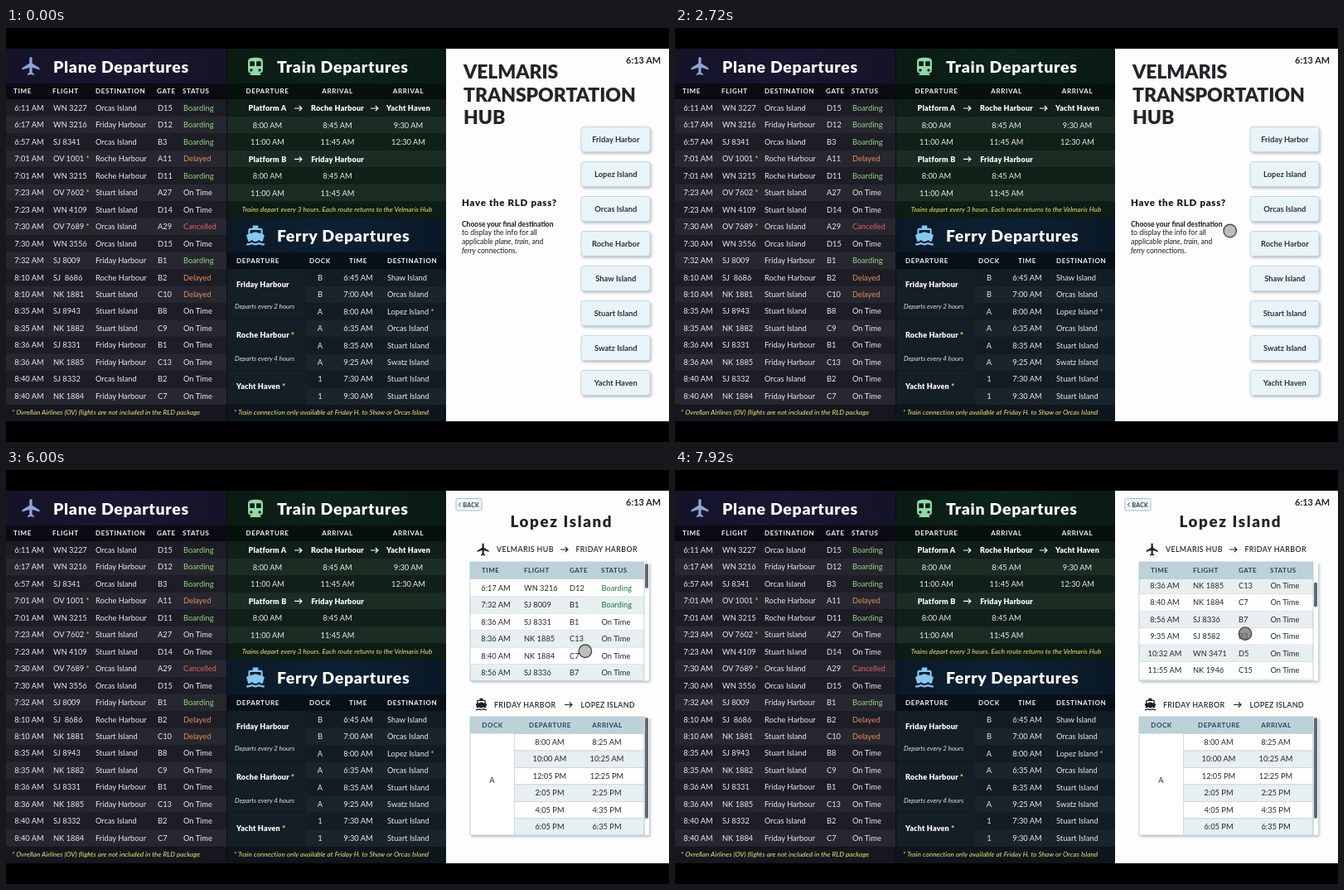
These frames come from a looping animation (800 px wide and 500 px high, 8 s). An HTML page:

```html
<!DOCTYPE html>
<html lang="en">
<head>
<meta charset="utf-8">
<title>Departures board</title>
<style>
html, body { margin: 0; width: 100%; height: 100%; overflow: hidden; background: #000; }
svg { display: block; width: 100vw; height: 100vh; }
text { font: 400 9.3px Lato, "Open Sans", sans-serif; fill: #e9e9ee; white-space: pre; }
.head { font-weight: 700; font-size: 8px; letter-spacing: .65px; fill: #f2f2f5; }
.title { font-weight: 900; font-size: 19.5px; letter-spacing: .7px; fill: #fff; }
.place { font-weight: 900; font-size: 9px; letter-spacing: .2px; fill: #fff; }
.note { font-style: italic; font-size: 8.2px; letter-spacing: .04px; fill: #f0e96a; }
.small { font-style: italic; font-size: 7.9px; fill: #dfe4e8; }
.hub { font-weight: 900; font-size: 23px; letter-spacing: -.1px; fill: #232529; }
.clock { font-weight: 700; font-size: 10.9px; fill: #232529; }
.btn { font-weight: 700; font-size: 9.4px; fill: #2d3338; }
.ask { font-weight: 900; font-size: 11.5px; letter-spacing: .7px; fill: #17191c; }
.para { font-size: 8.6px; fill: #17191c; }
.bold { font-weight: 700; font-size: 8.5px; fill: #17191c; }
.island { font-weight: 900; font-size: 18.8px; letter-spacing: 1.6px; fill: #222428; }
.route { font-weight: 600; font-size: 8.9px; letter-spacing: .35px; fill: #26292d; }
.back { font-weight: 700; font-size: 7px; letter-spacing: .2px; fill: #2b3338; }
.dark { fill: #25282c; }
.lhead { font-weight: 700; font-size: 8px; letter-spacing: .5px; fill: #2f4350; }
.star { fill: #e8dc3c; }
</style>
</head>
<body>
<svg id="stage" viewBox="0 0 800 500" preserveAspectRatio="none">
  <defs>
    <linearGradient id="plane"><stop offset="0" stop-color="#141328"/><stop offset=".5" stop-color="#191731"/><stop offset="1" stop-color="#151328"/></linearGradient>
    <linearGradient id="train"><stop offset="0" stop-color="#0a1b13"/><stop offset=".5" stop-color="#0b2419"/><stop offset="1" stop-color="#091a12"/></linearGradient>
    <linearGradient id="ferry"><stop offset="0" stop-color="#0b1927"/><stop offset=".5" stop-color="#0d2134"/><stop offset="1" stop-color="#0a1826"/></linearGradient>
    <filter id="shadow" x="-10%" y="-20%" width="125%" height="150%">
      <feDropShadow dx="1.5" dy="2" stdDeviation="1.5" flood-color="#4d6570" flood-opacity=".4"/>
    </filter>
    <clipPath id="window"><rect x="560" y="132" width="210" height="122"/></clipPath>
  </defs>
</svg>
<script>
const stage = document.getElementById('stage');

function add(parent, tag, attrs) {
  const el = document.createElementNS('http://www.w3.org/2000/svg', tag);
  for (const k in attrs) el.setAttribute(k, attrs[k]);
  return parent.appendChild(el);
}
const group = (attrs, parent = stage) => add(parent, 'g', attrs);
const box = (g, x, y, width, height, fill, more) => add(g, 'rect', { x, y, width, height, fill, ...more });

// y is the middle of the capitals; a trailing star is coloured
function text(g, x, y, str, cls = '', anchor = 'start', fill) {
  const el = add(g, 'text', { x, class: cls, 'text-anchor': anchor });
  el.setAttribute('y', y + parseFloat(getComputedStyle(el).fontSize) * .36);
  if (fill) el.style.fill = fill;
  const starred = str.endsWith(' *');
  el.textContent = starred ? str.slice(0, -1) : str;
  if (starred) add(el, 'tspan', { class: 'star' }).textContent = '*';
  return el;
}
const mid = (g, x, y, str, cls, fill) => text(g, x, y, str, cls, 'middle', fill);

function arrow(g, x, y, color) {
  add(g, 'path', { d: `M${x} ${y}h9m-3.2-3l3.2 3-3.2 3`, fill: 'none', stroke: color, 'stroke-width': 1.1 });
}

const shapes = {
  plane: 'M21 16v-2l-8-5V3.5a1.5 1.5 0 0 0-3 0V9l-8 5v2l8-2.5V19l-2 1.5V22l3.5-1 3.5 1v-1.5L13 19v-5.5z',
  train: 'M12 2c-4 0-8 .5-8 4v9.5C4 17.4 5.6 19 7.5 19L6 20.5v.5h12v-.5L16.5 19c1.9 0 3.5-1.6 3.5-3.5V6c0-3.5-3.6-4-8-4zM7.5 17a1.5 1.5 0 1 1 0-3 1.5 1.5 0 0 1 0 3zm3.5-6H6V6h5zm5.5 6a1.5 1.5 0 1 1 0-3 1.5 1.5 0 0 1 0 3zm1.5-6h-5V6h5z',
  ferry: 'M20 21q-2 0-4-1.3-4 2.6-8 0Q6 21 4 21H2v2h2q2 0 4-1 4 2 8 0 2 1 4 1h2v-2zM4 19q2.3 0 4-2 1.7 2 4 2t4-2q1.7 2 4 2l1.9-6.7q.3-1-.7-1.3L20 10.6V6q0-2-2-2h-3V1H9v3H6Q4 4 4 6v4.6l-1.3.4q-1 .3-.7 1.3zM6 6h12v4L12 8 6 10z'
};
function icon(g, name, x, y, scale, fill) {
  add(g, 'path', { d: shapes[name], fill, 'fill-rule': 'evenodd', transform: `translate(${x} ${y}) scale(${scale}) translate(-12 -12)` });
}

const status = { B: 'Boarding', D: 'Delayed', C: 'Cancelled', T: 'On Time' };
const tone = { B: '#93d483', D: '#e48d5e', C: '#e2605f' };
const STEP = 20.47;

function planes(g) {
  box(g, 0, 25, 266, 450, '#16161f');
  box(g, 0, 25, 266, 42, 'url(#plane)');
  box(g, 0, 67, 266, 19, '#0b0b13');
  icon(g, 'plane', 30.5, 46, 1.1, '#8fa3d6');
  text(g, 57, 47, 'Plane Departures', 'title');
  [['TIME', 9], ['FLIGHT', 56], ['DESTINATION', 108], ['GATE', 182], ['STATUS', 213]]
    .forEach(([s, x]) => text(g, x, 76, s, 'head'));
  `6:11|WN 3227|Orcas Island|D15|B
6:17|WN 3216|Friday Harbour|D12|B
6:57|SJ 8341|Orcas Island|B3|B
7:01|OV 1001 *|Roche Harbour|A11|D
7:01|WN 3215|Roche Harbour|D11|B
7:23|OV 7602 *|Stuart Island|A27|T
7:23|WN 4109|Stuart Island|D14|T
7:30|OV 7689 *|Orcas Island|A29|C
7:30|WN 3556|Orcas Island|D15|T
7:32|SJ 8009|Friday Harbour|B1|B
8:10|SJ  8686|Roche Harbour|B2|D
8:10|NK 1881|Stuart Island|C10|D
8:35|SJ 8943|Stuart Island|B8|T
8:35|NK 1882|Stuart Island|C9|T
8:36|SJ 8331|Friday Harbour|B1|T
8:36|NK 1885|Friday Harbour|C13|T
8:40|SJ 8332|Orcas Island|B2|T
8:40|NK 1884|Friday Harbour|C7|T`.split('\n').forEach((line, i) => {
    const [time, flight, place, gate, s] = line.split('|');
    const y = 96.5 + i * STEP;
    box(g, 0, y - 10.2, 266, STEP, i % 2 ? '#27272f' : '#1d1d26');
    mid(g, 28, y, time + ' AM');
    text(g, 57, y, flight);
    text(g, 108, y, place);
    text(g, 183, y, gate);
    text(g, 214, y, status[s], '', 'start', tone[s]);
  });
  text(g, 7, 464.5, '* Ovrellan Airlines (OV) flights are not included in the RLD package', 'note');
}

function trains(g) {
  box(g, 267, 25, 264, 205, '#0d1c14');
  box(g, 267, 25, 264, 42, 'url(#train)');
  box(g, 267, 67, 264, 19, '#07110c');
  icon(g, 'train', 301, 47, 1.12, '#93d8aa');
  text(g, 327, 47, 'Train Departures', 'title');
  const cols = [315.5, 400, 485.5];
  ['DEPARTURE', 'ARRIVAL', 'ARRIVAL'].forEach((s, i) => mid(g, cols[i], 76, s, 'head'));
  ['Platform A|Roche Harbour|Yacht Haven', '8:00 AM|8:45 AM|9:30 AM', '11:00 AM|11:45 AM|12:30 AM',
    'Platform B|Friday Harbour', '8:00 AM|8:45 AM', '11:00 AM|11:45 AM'].forEach((line, i) => {
    const y = 97 + i * STEP, named = i % 3 === 0;
    box(g, 267, y - 10.5, 264, STEP, i % 2 ? '#1b2d23' : '#101f17');
    line.split('|').forEach((s, j) => {
      mid(g, cols[j], y, s, named ? 'place' : '');
      if (named && j) arrow(g, j === 1 ? 348 : 440, y, '#fff');
    });
  });
  mid(g, 399.5, 219, 'Trains depart every 3 hours. Each route returns to the Velmaris Hub', 'note');
}

function ferries(g) {
  box(g, 267, 230, 264, 245, '#0d161c');
  box(g, 267, 230, 264, 41, 'url(#ferry)');
  box(g, 267, 271, 264, 20, '#081017');
  icon(g, 'ferry', 301, 250.5, 1.08, '#84c8f0');
  text(g, 327, 251, 'Ferry Departures', 'title');
  [['DEPARTURE', 278], ['DOCK', 366], ['TIME', 414], ['DESTINATION', 460]]
    .forEach(([s, x]) => text(g, x, 281, s, 'head'));
  `B|6:45|Shaw Island
B|7:00|Orcas Island
A|8:00|Lopez Island *
A|6:35|Orcas Island
A|8:35|Stuart Island
A|9:25|Swatz Island
1|7:30|Stuart Island
1|9:30|Stuart Island`.split('\n').forEach((line, i) => {
    const [dock, time, place] = line.split('|'), y = 301.3 + i * STEP;
    box(g, 362, y - 10.2, 169, STEP, i % 2 ? '#19242b' : '#121c23');
    mid(g, 379, y, dock);
    mid(g, 425, y, time + ' AM');
    text(g, 460, y, place);
  });
  [[291, 61], [352.5, 61], [414, 41]].forEach(([y, h]) => box(g, 267, y, 95, h - .5, '#141e25'));
  text(g, 278, 310, 'Friday Harbour', 'place');
  text(g, 276, 336, 'Departs every 2 hours', 'small');
  text(g, 278, 370.5, 'Roche Harbour *', 'place');
  text(g, 276, 399, 'Departs every 4 hours', 'small');
  text(g, 278, 433, 'Yacht Haven *', 'place');
  text(g, 275, 464.5, '* Train connection only available at Friday H. to Shaw or Orcas Island', 'note');
}

let lopez;
function menu(g) {
  ['VELMARIS', 'TRANSPORTATION', 'HUB'].forEach((s, i) => text(g, 552, 53 + i * 27.5, s, 'hub'));
  text(g, 550, 210.5, 'Have the RLD pass?', 'ask');
  text(g, 550, 236.8, 'Choose your final destination', 'bold');
  text(g, 550, 247.4, 'to display the info for all', 'para');
  const mixed = (y, html) => { text(g, 550, y, '', 'para').innerHTML = html; };
  const em = s => `<tspan font-style="italic">${s}</tspan>`;
  mixed(258, `applicable ${em('plane')}, ${em('train')}, and`);
  mixed(268.6, `${em('ferry')} connections.`);
  ['Friday Harbor', 'Lopez Island', 'Orcas Island', 'Roche Harbor', 'Shaw Island',
    'Stuart Island', 'Swatz Island', 'Yacht Haven'].forEach((s, i) => {
    const y = 134.5 + i * 42;
    const r = box(g, 694, y - 15, 83, 30, '#e9f4f9', { rx: 3, stroke: '#b9d0dc', 'stroke-width': .8, filter: 'url(#shadow)' });
    if (i === 1) lopez = r;
    mid(g, 735.8, y, s, 'btn');
  });
}

let list, thumb;
function details(g) {
  const ink = '#1d2024', tint = '#e8eff1', head = '#bdd1d9';
  box(g, 543, 34.5, 31, 14.5, '#f0f7fa', { rx: 1.5, stroke: '#9dbfd1', 'stroke-width': 1 });
  add(g, 'path', { d: 'M548.5 39.5l-2 2.4 2 2.4', fill: 'none', stroke: '#2b3338', 'stroke-width': .9 });
  text(g, 551.5, 42, 'BACK', 'back');
  mid(g, 670.3, 62.5, 'Lopez Island', 'island');

  icon(g, 'plane', 576, 96, .74, ink);
  text(g, 592, 96, 'VELMARIS HUB', 'route');
  arrow(g, 669, 96, ink);
  text(g, 687.5, 96, 'FRIDAY HARBOR', 'route');

  box(g, 560, 111, 216, 143.5, '#fff', { filter: 'url(#shadow)' });
  list = group({}, group({ 'clip-path': 'url(#window)' }, g));
  `6:17|WN 3216|D12|B
7:32|SJ 8009|B1|B
8:36|SJ 8331|B1|T
8:36|NK 1885|C13|T
8:40|NK 1884|C7|T
8:56|SJ 8336|B7|T
9:35|SJ 8582|B3|T
10:32|WN 3471|D5|T
11:55|NK 1946|C15|T`.split('\n').forEach((line, i) => {
    const [time, flight, gate, s] = line.split('|'), y = 142.5 + i * STEP;
    if (i % 2) box(list, 560, y - 10.2, 210, STEP, tint, { stroke: '#cfdde3', 'stroke-width': .7 });
    mid(list, 591, y, time + ' AM', 'dark');
    text(list, 625, y, flight, 'dark');
    text(list, 680, y, gate, 'dark');
    text(list, 718.5, y, status[s], 'dark', 'start', s === 'B' ? '#1c7a36' : '');
  });
  box(list, 560, 132.3 + 9 * STEP, 210, STEP, tint);
  box(g, 560, 111, 210, 21, head);
  [['TIME', 574], ['FLIGHT', 625], ['GATE', 680], ['STATUS', 718]]
    .forEach(([s, x]) => text(g, x, 121.5, s, 'lhead'));
  box(g, 560, 111, 210, 143.5, 'none', { stroke: '#b4cad3', 'stroke-width': .8 });
  thumb = box(g, 771, 113, 4, 30, '#62686f', { rx: 2 });

  icon(g, 'ferry', 573.5, 283, .66, ink);
  text(g, 589, 283.5, 'FRIDAY HARBOR', 'route');
  arrow(g, 674, 283.5, ink);
  text(g, 693.5, 283.5, 'LOPEZ ISLAND', 'route');

  box(g, 560, 298, 216, 143, '#fff', { filter: 'url(#shadow)' });
  ['8:00 AM|8:25 AM', '10:00 AM|10:25 AM', '12:05 PM|12:25 PM', '2:05 PM|2:25 PM',
    '4:05 PM|4:35 PM', '6:05 PM|6:35 PM'].forEach((line, i) => {
    const [dep, arr] = line.split('|'), y = 328.5 + i * STEP;
    box(g, 613.5, y - 10, 156.5, STEP, i % 2 ? tint : '#fff', { stroke: '#c3d5dd', 'stroke-width': .8 });
    mid(g, 656, y, dep, 'dark');
    mid(g, 725, y, arr, 'dark');
  });
  box(g, 560, 298, 210, 20.5, head);
  [['DOCK', 587], ['DEPARTURE', 656.5], ['ARRIVAL', 725.5]]
    .forEach(([s, x]) => mid(g, x, 308.5, s, 'lhead'));
  mid(g, 586.5, 374.5, 'A', 'dark');
  box(g, 560, 298, 210, 143, 'none', { stroke: '#b4cad3', 'stroke-width': .8 });
  box(g, 771, 299, 4, 122, '#62686f', { rx: 2 });
}

planes(group());
trains(group());
ferries(group());
box(stage, 266, 25, 1, 450, '#0b0d12');
box(stage, 531, 25, 269, 450, '#fdfdfd');
const home = group(), info = group();
menu(home);
details(info);
text(stage, 790, 39.5, '6:13 AM', 'clock', 'end');
const dot = add(stage, 'circle', { r: 7.7, stroke: '#4b4b4d', 'stroke-width': 1.4 });

const LOOP = 8000, TICK = 80;
const OPEN = 4080, DRAG = 7158;
// time, x, y
const path = [[0, 610, 332], [2160, 610, 332], [3200, 717, 176], [5440, 717, 176], [6400, 688, 244.5], [LOOP, 688, 244.5]];

function along(t) {
  const i = path.findIndex(p => p[0] > t), [a, x, y] = path[i - 1], [b, u, v] = path[i];
  const k = (t - a) / (b - a), e = k * k * (3 - 2 * k);
  return [x + (u - x) * e, y + (v - y) * e];
}

function draw(t) {
  const pull = 22 * (Math.max(0, t - DRAG) / 522) ** 2;
  const scroll = pull * 1.375;
  const down = (t >= 3600 && t < OPEN) || t >= 6720;
  const [x, y] = along(t);
  home.style.display = t < OPEN ? '' : 'none';
  info.style.display = t < OPEN ? 'none' : '';
  lopez.setAttribute('fill', down ? '#c1cacd' : '#e9f4f9');
  list.setAttribute('transform', `translate(0 ${-scroll})`);
  thumb.setAttribute('y', 113 + scroll * .35);
  dot.setAttribute('cx', x);
  dot.setAttribute('cy', y - pull);
  dot.setAttribute('fill', down ? 'rgba(105,105,108,.72)' : 'rgba(150,150,152,.62)');
  dot.setAttribute('opacity', Math.min(1, Math.max(0, (t - 1360) / 240)));
}

const start = performance.now();
function loop() {
  const t = (performance.now() - start) % LOOP;
  draw(Math.floor(t / TICK) * TICK);
  requestAnimationFrame(loop);
}
loop();
</script>
</body>
</html>
```
